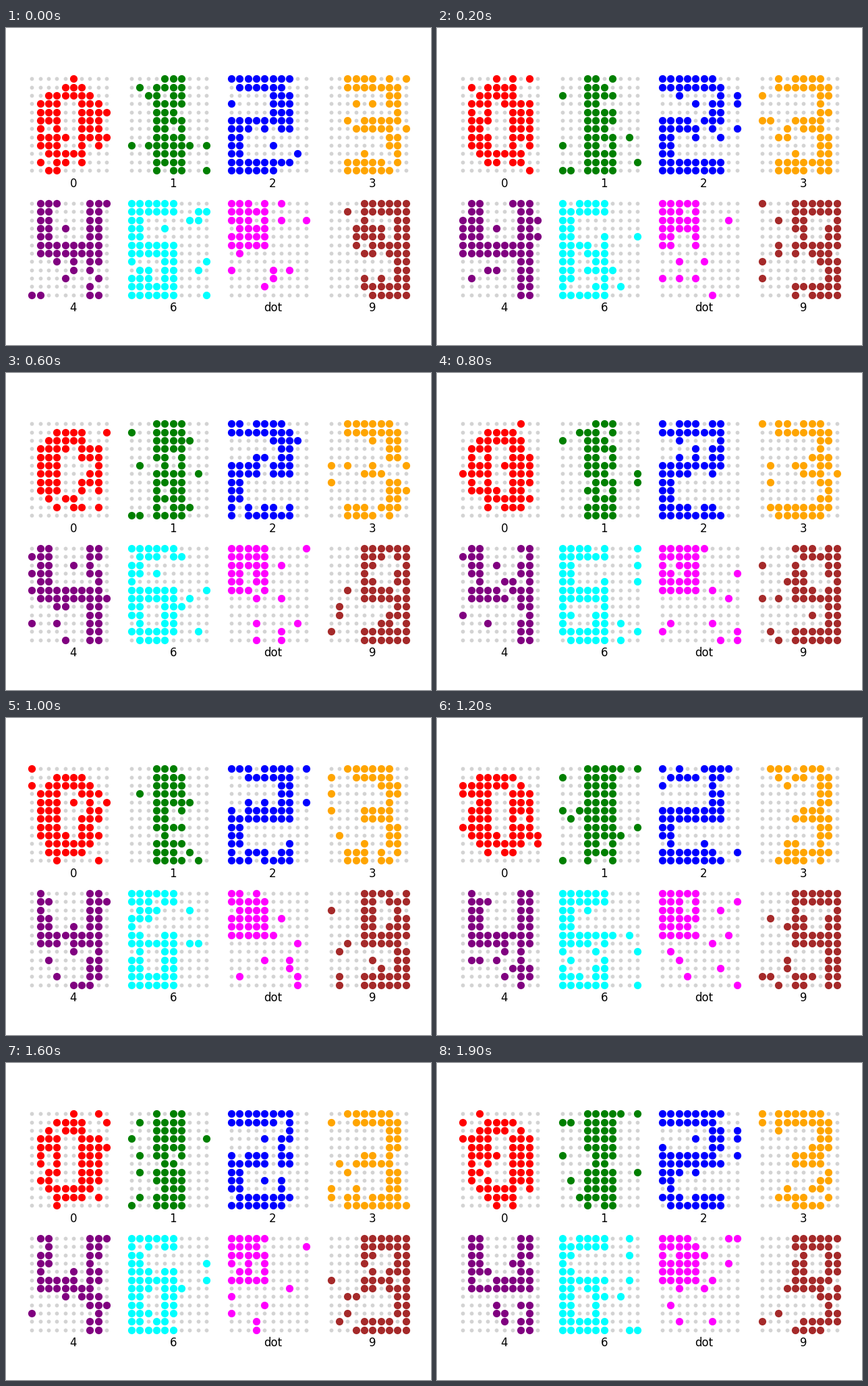
Write a matplotlib script that moves like this. It is 630 by 470 pixels and loops after 2400 ms.

```python
import numpy as np
import matplotlib.pyplot as plt
from matplotlib.animation import FuncAnimation

W, H, DPI = 630, 470, 100
ROWS, COLS = 12, 10
PITCH = 12.32
X0, Y0 = 38.22, 75.35
STEP_MS, STATES, SLOTS = 100, 20, 24   # the last state is held
FLIPS = ROWS * COLS // 10

# label, colour, boxes (row start, row end, col start, col end) toggled in turn
GLYPHS = [
    ("0", "red", [(1, 11, 3, 7), (2, 10, 2, 3), (2, 10, 7, 8),
                  (3, 9, 1, 2), (3, 9, 8, 9), (3, 9, 4, 6)]),
    ("1", "green", [(0, 12, 3, 7)]),
    ("2", "blue", [(0, 12, 0, 8), (2, 5, 0, 6), (7, 10, 2, 8)]),
    ("3", "orange", [(0, 12, 2, 8), (1, 11, 8, 9), (2, 10, 2, 7),
                     (5, 7, 4, 7), (5, 7, 8, 9)]),
    ("4", "purple", [(0, 7, 1, 9), (7, 12, 7, 9), (0, 5, 3, 7)]),
    ("6", "cyan", [(0, 12, 0, 6), (2, 5, 2, 6), (7, 10, 2, 4)]),
    ("dot", "magenta", [(0, 6, 0, 5)]),
    ("9", "brown", [(0, 12, 4, 10), (2, 5, 6, 8), (7, 10, 4, 8)]),
]


def bitmap(boxes):
    grid = np.zeros((ROWS, COLS), bool)
    for r0, r1, c0, c1 in boxes:
        grid[r0:r1, c0:c1] ^= True
    return grid.ravel()


def place(k, row, col):
    """Stage position of a cell in panel k."""
    return (X0 + PITCH * (col + 12 * (k % 4)),
            Y0 + PITCH * (row + 15 * (k // 4)))


# cells flipped by noise, for every state and panel
np.random.seed(7)
noise = [[np.random.choice(ROWS * COLS, FLIPS, replace=False) for _ in GLYPHS]
         for _ in range(STATES)]

plt.rcParams["font.family"] = "DejaVu Sans"
fig = plt.figure(figsize=(W / DPI, H / DPI), dpi=DPI, facecolor="white")
ax = fig.add_axes([0, 0, 1, 1])
ax.set_xlim(0, W)
ax.set_ylim(H, 0)
ax.axis("off")

rr, cc = np.divmod(np.arange(ROWS * COLS), COLS)
panels = []
for k, (label, color, boxes) in enumerate(GLYPHS):
    x, y = place(k, rr, cc)
    ax.scatter(x, y, s=10, color="lightgray", zorder=1)
    dots = ax.scatter([], [], s=50, color=color, zorder=2)
    ax.text(*place(k, 13, 5), label, fontsize=12, ha="center", va="baseline")
    panels.append((dots, np.column_stack([x, y]), bitmap(boxes)))


def update(i):
    state = noise[min(i, STATES - 1)]
    for (dots, xy, clean), flips in zip(panels, state):
        noisy = clean.copy()
        noisy[flips] ^= True
        dots.set_offsets(xy[noisy])
    return [p[0] for p in panels]


def init():
    return update(0)


anim = FuncAnimation(fig, update, frames=SLOTS, init_func=init,
                     interval=STEP_MS, repeat=True, repeat_delay=0)
plt.show()
```
